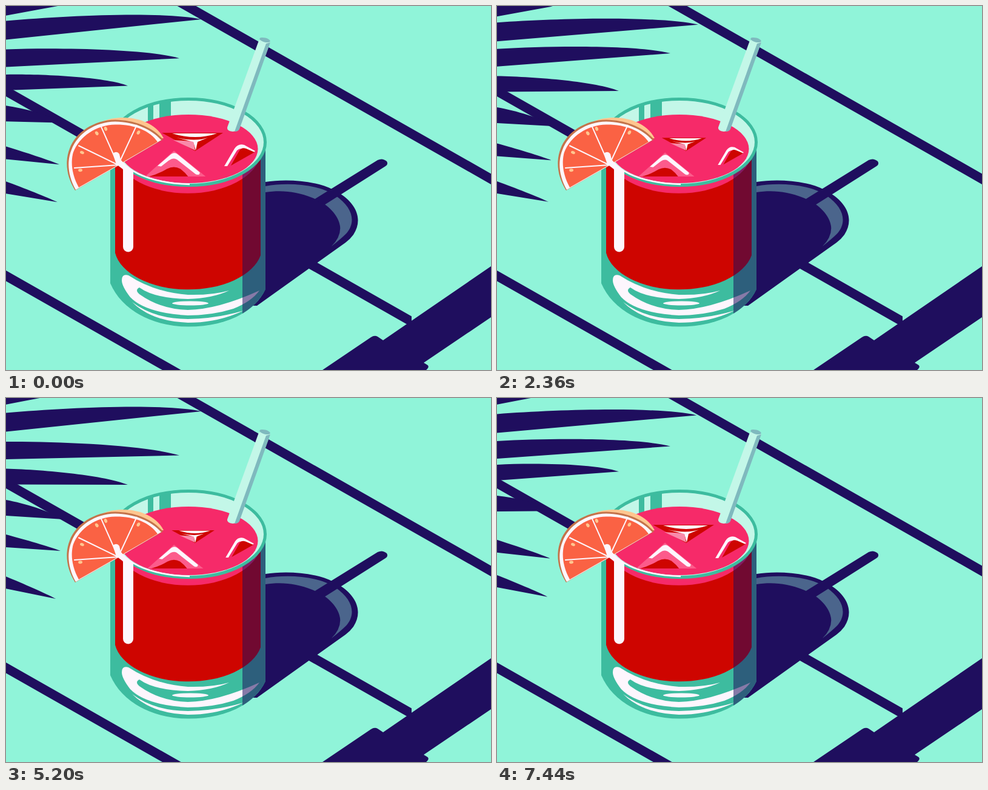
Recreate the animation shown at these times as an HTML page. Size 800 px wide and 600 px high, loop 7.48 s.

```html
<!DOCTYPE html>
<html lang="en">
<head>
<meta charset="utf-8">
<title>Summer drink</title>
<style>
  html, body { margin: 0; width: 100%; height: 100%; overflow: hidden; background: #90f4d9; }
  svg { display: block; width: 100vw; height: 100vh; }
  .navy { fill: #1f0e5e; }
  .teal { fill: #3dbc9f; }
  .pale { fill: #c3f7e8; }
  .white { fill: #fdf6fd; }
  .red { fill: #ce0500; }
  .pink { fill: #f62a69; }
  .peach { fill: #ffc68f; }
  .line { fill: none; stroke: #fdf6fd; }
</style>
</head>
<body>
<svg viewBox="0 0 800 600">
  <defs>
    <clipPath id="mouth"><ellipse cx="301" cy="224.500" rx="126" ry="71"/></clipPath>
  </defs>
  <rect width="800" height="600" fill="#90f4d9"/>

  <g class="navy">
    <path id="stripes"/>
    <path d="M800 429L622 551L613 545Q608 542 602 546L522 600H693Q700 594 694 591L689 588L800 513Z"/>
    <path id="leaves"/>
  </g>

  <g id="shadow">
    <path class="navy" d="M400 300L428 290C460 285 510 287 540 303C578 322 590 351 573 377Q568 384 560 390L414 494H390Z"/>
    <path fill="#4b658c" d="M428 297C465 290 515 294 543 312C572 332 577 355 563 373Q557 380 537 396Q553 380 551 363C549 345 530 325 505 316C480 306 455 303 428 307Z"/>
    <path class="navy" d="M508 319L613 254Q621 250 628 256Q631 261 626 264L525 328Z"/>
  </g>

  <g id="body">
    <path class="teal" d="M172 224V457C190 500 240 528.500 301 528.500S410 505 428 467V224Z"/>
    <path class="red" d="M180 224V407A122 71 0 0 0 420 411V224Z"/>
    <path class="pink" d="M180 224V246A121 72 0 0 0 420 246V224Z"/>
    <path class="white" d="M191 452Q191 441 202 444Q245 472 300 476Q340 477 368 469Q340 482 300 483Q245 482 220 464Q212 468 220 475Q255 500 300 501Q350 500 418 469Q405 487 375 499Q340 510 300 510Q230 506 205 480Q191 462 191 452Z"/>
    <ellipse class="white" cx="304" cy="490" rx="30" ry="3.500"/>
    <path class="white" d="M208 488Q245 516 300 516Q350 515 392 502Q350 522 300 522Q240 520 208 488Z"/>
    <path class="navy" opacity=".53" d="M390 276Q418 262 428 236V467Q415 492 390 507Z"/>
  </g>

  <g id="top">
    <ellipse class="pale" cx="301" cy="224.500" rx="126.500" ry="71"/>
    <g clip-path="url(#mouth)">
      <path class="teal" d="M234 150H243V205H234ZM253 150H272V205H253Z"/>
      <ellipse class="pink" cx="301" cy="235.500" rx="114.500" ry="56.500"/>
      <g id="iceA">
        <path class="red" d="M257 209H358L312 239Z"/>
        <path fill="#f98aaa" d="M276 221L309 223L312 238Z"/>
        <path class="white" d="M274 210H348Q313 222 274 210Z"/>
        <path class="white" d="M281 217Q313 224 333 217L316 224L313 238L309 224Z"/>
      </g>
      <g id="iceB">
        <path fill="#fc5b8b" d="M277 237L331 281H228Z"/>
        <path class="white" d="M249 263L272 243Q278 239 283 243L321 274Q321 280 314 277L282 252Q276 248 268 254L255 264Z"/>
        <path class="red" d="M235 281Q250 277 265 268Q277 262 288 268Q296 274 301 281Z"/>
      </g>
      <g id="iceC">
        <path class="white" d="M360 264L377 235Q383 226 393 229L411 239L408 242L394 236Q386 233 381 238L365 264Z"/>
        <path class="red" d="M371 263L384 240Q388 232 396 235L410 241Z"/>
      </g>
    </g>
    <ellipse cx="301" cy="224.500" rx="126.500" ry="71" fill="none" stroke="#3dbc9f" stroke-width="5"/>
    <path class="line" stroke-width="2.500" d="M191 257Q222 291 303 294"/>
  </g>

  <g id="straw">
    <path class="pale" d="M417 57L365 200Q364 206 374 207L380 206L436 60Q427 52 417 57Z"/>
    <path fill="#7fb9be" d="M429 62L436 60L385 203Q383 207 377 207Z"/>
    <ellipse fill="#7fb9be" cx="427" cy="56" rx="9" ry="3.500" transform="rotate(14 427 56)"/>
  </g>

  <g id="orange">
    <path class="peach" d="M160 190C187 178 242 182 260 218L240 218Z"/>
    <path fill="#c4734a" d="M114 304C99 280 97 255 105 235C115 208 145 188 180 187.500C213 188 242 200 259 220L185 263Z"/>
    <path class="white" d="M115 303C102 280 100 256 108 237C118 210 147 191 180 190.500C212 191 240 203 256 221L185 263Z"/>
    <path fill="#fa6244" d="M120 299C109 279 106 258 111 241C121 215 149 196 180 195.500C211 195 237 205 250 224L185 262Z"/>
    <path id="spokes" class="line" stroke-width="2"/>
    <g id="seeds" class="peach"></g>
  </g>

  <path class="white" d="M176 243Q183 238 187 244L189 253Q197 263 210 271V397A8.500 8.500 0 0 1 193 397V269L182 261Z"/>
</svg>
<script>
const FRAME = 40, LOOP = 7480;
const $ = id => document.getElementById(id);
const mix = (a, b, f) => a + (b - a) * f;

// Eases between low and high; times are in steps, so rise and fall may differ.
const wave = (period, peak, trough, low, high) => step => {
  const mod = n => (n % period + period) % period;
  const rise = mod(peak - trough), u = mod(step - trough);
  const f = u < rise ? u / rise : (period - u) / (period - rise);
  return mix(low, high, (1 - Math.cos(Math.PI * f)) / 2);
};

// A blade from the left edge to its tip; the root follows part of the tip's swing.
const leaf = ({ tip, x, y, root, width, follow, bulge, drift = 0 }) => step => {
  const tipY = tip(step), swing = tipY - y;
  const top = root + follow * swing, tipX = x + drift * swing;
  const bend = (f, lift) => `${f * tipX} ${mix(top, tipY, f) - lift * bulge}`;
  return `M0 ${top}C${bend(0.33, 1)} ${bend(0.82, 1.5)} ${tipX} ${tipY}L0 ${top + width}Z`;
};

const leaves = [
  leaf({ tip: wave(28, 6, 17, -7, 1), x: 92, y: -1, root: -10, width: 26, follow: 0.9, bulge: 0 }),
  leaf({ tip: wave(26, 8, 17.5, 12, 31), x: 320, y: 20, root: 24, width: 31, follow: 0.3, bulge: 9, drift: 1.1 }),
  leaf({ tip: wave(21, 7, 14.3, 76, 97), x: 286, y: 87, root: 71.5, width: 29, follow: 0.08, bulge: 8 }),
  leaf({ tip: wave(24, 8.5, 16.8, 121, 145), x: 201, y: 135, root: 114, width: 26, follow: 0.3, bulge: 7 }),
  leaf({ tip: wave(24, 8.5, 16.8, 186, 201), x: 91, y: 192, root: 164, width: 26, follow: 0.5, bulge: 5 }),
  leaf({ tip: wave(23, 6.6, 15, 252, 268), x: 88, y: 262, root: 232, width: 21, follow: 0.7, bulge: 1, drift: -0.2 }),
  leaf({ tip: wave(27, 17.5, 2.5, 322, 335), x: 85, y: 323, root: 289, width: 20, follow: 0.65, bulge: 1, drift: -0.35 })
];

const ice = [
  { el: $('iceA'), x: 311, y: 239, size: wave(37, 0, 18.5, 0.7, 1) },
  { el: $('iceB'), x: 279, y: 281, size: wave(40, 32, 15, 0.88, 1) },
  { el: $('iceC'), x: 386, y: 252, size: wave(46, 0, 24, 0.71, 1) }
];

function drawStripes() {
  const slope = 0.568, height = 17.5;
  const stripe = (y, end) => `M0 ${y}L${end} ${y + slope * end}v${height}L0 ${y + height}Z`;
  $('stripes').setAttribute('d', stripe(-178, 800) + stripe(131.5, 669) + stripe(436, 300));
}

function drawOrange() {
  const polar = (deg, r) => {
    const a = deg * Math.PI / 180;
    return [185 - r * Math.cos(a), 262 - r * Math.sin(a)];
  };
  $('spokes').setAttribute('d', [-4, 26, 66, 115].map(a => `M185 262L${polar(a, 73)}`).join(''));
  $('seeds').innerHTML = [-8, 19, 56, 71, 122].map(a => {
    const [x, y] = polar(a, 63);
    return `<ellipse rx="3.5" ry="2.5" transform="translate(${x} ${y}) rotate(${a})"/>`;
  }).join('');
}

function draw(ms) {
  const step = Math.floor(ms % LOOP / FRAME);
  $('leaves').setAttribute('d', leaves.map(shape => shape(step)).join(''));
  for (const { el, x, y, size } of ice)
    el.setAttribute('transform', `translate(${x} ${y}) scale(${size(step)}) translate(${-x} ${-y})`);
}

drawStripes();
drawOrange();
const start = performance.now();
function tick() {
  draw(performance.now() - start);
  requestAnimationFrame(tick);
}
tick();
</script>
</body>
</html>
```
